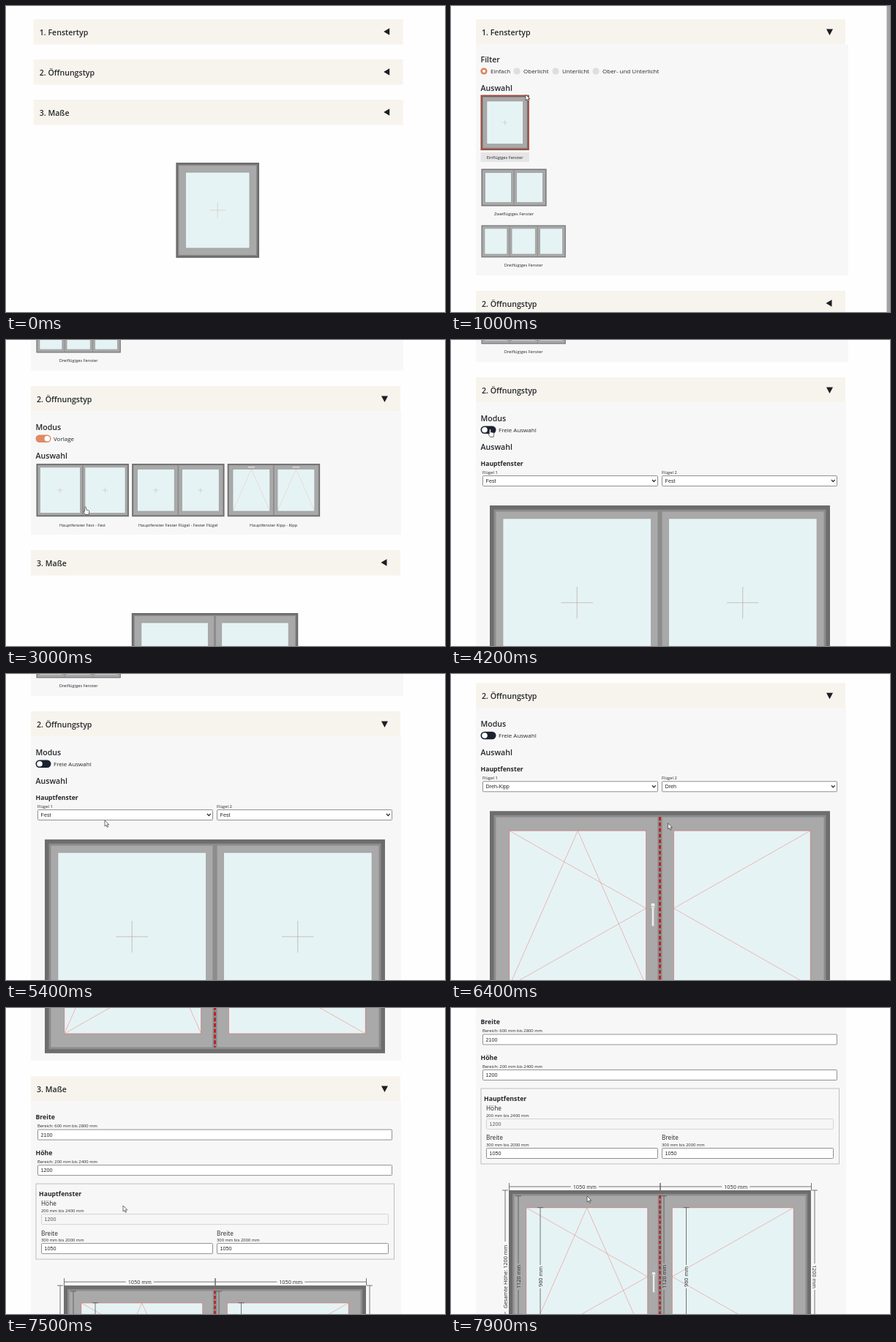
Recreate the animation shown at these times as an HTML page. Size 600 px wide and 418 px high, loop 8 s.

```html
<!DOCTYPE html>
<html lang="de">
<head>
<meta charset="utf-8">
<title>Fensterkonfigurator</title>
<style>
  html, body { margin: 0; width: 100%; height: 100%; overflow: hidden; background: #fefefe; }
  svg { display: block; width: 100vw; height: 100vh; }
  text { font-family: "Open Sans", "Noto Sans", sans-serif; fill: #25272b; }
  text.field { font-family: "Liberation Sans", sans-serif; }
</style>
</head>
<body>
<svg id="stage" viewBox="0 0 600 418"></svg>
<script>
const LOOP = 8000, STEP = 100;
const stage = document.getElementById('stage');

// Keyframes: [time, value...]
const SCROLL = [[1400, 0], [1900, 170], [2500, 170], [2900, 326], [3200, 326], [3800, 338],
  [6300, 338], [6700, 586], [7000, 586], [7900, 898]];
const POINTER = [[200, 190, 70], [400, 110, 38], [600, 110, 38], [1000, 102, 121], [1300, 100, 248],
  [1700, 100, 248], [2100, 99, 230], [2600, 99, 230], [3000, 107, 228], [3300, 107, 228],
  [3900, 52, 122], [4400, 52, 122], [5200, 130, 194], [5400, 135, 200], [6100, 135, 200],
  [6200, 135, 192], [6300, 350, 192], [6600, 144, 238], [6800, 144, 238], [6900, 120, 290],
  [7100, 120, 290], [7800, 186, 257]];

function track(keys, t) {
  if (t <= keys[0][0]) return keys[0].slice(1);
  for (let i = 1; i < keys.length; i++) {
    const a = keys[i - 1], b = keys[i];
    if (t < b[0]) {
      const p = (t - a[0]) / (b[0] - a[0]), e = p * p * (3 - 2 * p);
      return a.slice(1).map((v, k) => v + (b[k + 1] - v) * e);
    }
  }
  return keys[keys.length - 1].slice(1);
}

const rect = (x, y, w, h, fill, more = '') =>
  `<rect x="${x}" y="${y}" width="${w}" height="${h}" fill="${fill}" ${more}/>`;
const path = (d, stroke, width = 0.6, more = '') =>
  `<path d="${d}" fill="none" stroke="${stroke}" stroke-width="${width}" ${more}/>`;
const shape = (d, fill, more = '') => `<path d="${d}" fill="${fill}" ${more}/>`;
const group = (x, y, body) => `<g transform="translate(${x} ${y})">${body}</g>`;

// y is the vertical middle of the capitals
function text(s, x, y, size, more = '') {
  return `<text x="${x}" y="${y + size * 0.36}" font-size="${size}" ${more}>${s}</text>`;
}
const title = (s, x, y) => text(s, x, y, 10.6, 'font-weight="600"');
const bold = (s, x, y) => text(s, x, y, 8.7, 'font-weight="700"');
const hint = (s, x, y) => text(s, x, y, 5.8);
const caption = (s, x, y) => text(s, x, y, 5.7, 'text-anchor="middle"');

function field(x, y, w, value, disabled) {
  return rect(x + 0.5, y + 0.5, w - 1, 14, disabled ? '#f6f6f6' : '#fff',
      `stroke="${disabled ? '#ccc' : '#777'}" stroke-width=".8" rx="1"`) +
    text(value, x + 4.5, y + 7.5, 7.2, `class="field"${disabled ? ' fill-opacity=".75"' : ''}`);
}
const select = (x, y, value) => field(x, y, 240, value) +
  path(`M${x + 232} ${y + 6}l2.3 2.6l2.3 -2.6`, '#222', 1.2);

// Window elevation. s: pixels per mm; one letter code per sash:
// f fixed, o fixed sash, k tilt, tt tilt and turn, d turn
function pane(x, y, s, sashes) {
  const n = sashes.length, W = 1050 * n * s, H = 1200 * s;
  let out = rect(x, y, W, H, '#6d6d6d') +
    rect(x + 25 * s, y + 25 * s, W - 50 * s, H - 50 * s, '#8c8c8c');
  sashes.forEach((type, i) => {
    const first = i === 0, last = i === n - 1, fixed = type === 'f';
    const edge = (a, b, outer, inner) => [
      x + (1050 * i + (first ? outer : inner)) * s,
      x + (1050 * (i + 1) - (last ? outer : inner)) * s, a, b];
    const [sl, sr] = edge(0, 0, 38, 14);
    out += rect(sl, y + 38 * s, sr - sl, H - 76 * s, '#a9a9a9');
    const inset = fixed ? 81 : 121;
    const [l, r] = edge(0, 0, inset, fixed ? 54 : 85);
    const t = y + inset * s, b = y + H - inset * s, cx = (l + r) / 2, cy = (t + b) / 2;
    const moving = type === 'tt' || type === 'd' || type === 'k';
    out += rect(l, t, r - l, b - t, '#e6f3f4',
      `stroke="${moving && type !== 'k' ? '#cf7272' : '#9a9a9a'}" stroke-width=".7"`);
    if (!moving && s > 0.06) {
      const c = (s > 0.1 ? 98 : 60) * s;
      out += path(`M${cx - c} ${cy}h${2 * c}M${cx} ${cy - c}v${2 * c}`, s > 0.2 ? '#b49a98' : '#d8bdb4');
    }
    if (type === 'k' || type === 'tt')
      out += path(`M${l} ${b}L${cx} ${t}L${r} ${b}`, '#e98f8f', s > 0.1 ? 0.6 : 0.25);
    if (type === 'tt') out += path(`M${l} ${t}L${r} ${cy}L${l} ${b}`, '#e98f8f');
    if (type === 'd') out += path(`M${r} ${t}L${l} ${cy}L${r} ${b}`, '#e98f8f');
    if (type === 'k') out += rect(cx - 80 * s, y + 68 * s, 160 * s, 20 * s, '#e8e8e8');
  });
  if (sashes.includes('d')) {
    const mx = x + 1050 * s, hx = mx - 43 * s, my = y + 600 * s;
    out += path(`M${mx} ${y + 36 * s}V${y + H - 36 * s}`, '#c4151c', 12 * s,
      `stroke-dasharray="${22 * s} ${13 * s}"`);
    const grip = 'stroke="#888" stroke-width=".4"';
    out += rect(hx - 13 * s, my - 32 * s, 26 * s, 32 * s, '#efefef', grip) +
      rect(hx - 8 * s, my - 12 * s, 16 * s, 122 * s, '#efefef', grip);
  }
  return out;
}

function header(y, label, open) {
  const arrow = open ? `M513 ${y + 13.5}h9l-4.5 8.5z` : `M512.5 ${y + 17}l8 -4.7v9.4z`;
  return rect(34, y, 505, 34.5, '#f7f4ed') + title(label, 42, y + 18) + shape(arrow, '#1d1f24');
}
const panel = (y, h, w = 506) => rect(34, y, w, h, '#f7f7f7');

function typeSection(y, picked) {
  let out = panel(y + 35, 315, 509) + title('Filter', 40.5, y + 55);
  [[45, 'Einfach'], [90, 'Oberlicht'], [143, 'Unterlicht'], [198, 'Ober- und Unterlicht']]
    .forEach(([x, label], i) => {
      out += `<circle cx="${x}" cy="${y + 71}" r="4.6" fill="${i ? '#dedede' : '#d98560'}"/>`;
      if (!i) out += `<circle cx="${x}" cy="${y + 71}" r="2" fill="#fff"/>`;
      out += text(label, x + 9, y + 71, 8);
    });
  out += title('Auswahl', 40.5, y + 94);
  [['Ein', 104, 0.0613, 182, 189], ['Zwei', 204, 0.0424, 260, 266], ['Drei', 281, 0.0366, 330, 336]]
    .forEach(([name, top, s, box, mid], i) => {
      const w = 1050 * (i + 1) * s, h = 1200 * s;
      if (i === picked)
        out += rect(40.5, y + box, w + 2, 13, '#e5e5e5');
      out += pane(41.5, y + top + 0.5, s, Array(i + 1).fill('o'));
      if (i === picked)
        out += rect(41.5, y + top + 0.5, w, h, 'none', 'stroke="#a14f42" stroke-width="2"');
      out += caption(name + 'flügiges Fenster', 41.5 + w / 2, y + mid);
    });
  return out;
}

function openingSection(y, free, picked, sashes) {
  let out = panel(y + 35, free ? 416 : 168) + title('Modus', 40.5, y + 56) +
    rect(40.5, y + 66.5, 21, 10.5, free ? '#1b2230' : '#df8a63', 'rx="5.2"') +
    `<circle cx="${free ? 46 : 56.3}" cy="${y + 71.7}" r="3.8" fill="#fff"/>` +
    text(free ? 'Freie Auswahl' : 'Vorlage', 65, y + 72, 8) + title('Auswahl', 40.5, y + 95);
  if (free) {
    const names = { f: 'Fest', tt: 'Dreh-Kipp', d: 'Dreh' };
    out += bold('Hauptfenster', 40.5, y + 118);
    sashes.forEach((type, i) => {
      const x = 43 + 245 * i;
      out += hint('Flügel ' + (i + 1), x, y + 130) + select(x, y + 134, names[type]);
    });
    return out + pane(53, y + 175, 465 / 2100, sashes);
  }
  [['f', 'Fest - Fest'], ['o', 'Fester Flügel - Fester Flügel'], ['k', 'Kipp - Kipp']]
    .forEach(([type, name], i) => {
      const x = 41.5 + 130.6 * i;
      if (i === picked) out += rect(x - 1, y + 183, 128.5, 13, '#e5e5e5');
      out += pane(x, y + 106, 0.0602, [type, type]);
      if (i === picked) out += rect(x, y + 106, 126.4, 72.2, 'none', 'stroke="#a14f42" stroke-width="2"');
      out += caption('Hauptfenster ' + name, x + 63, y + 189.5);
    });
  return out;
}

// Vertical dimension line with rotated label
function heightMark(x, y, h, label, turn, half) {
  const m = y + h / 2, size = 7.3;
  return path(`M${x} ${y}V${m - half}M${x} ${m + half}V${y + h}M${x - 4} ${y}h8M${x - 4} ${y + h}h8`, '#555', 0.8) +
    `<text transform="translate(${x} ${m}) rotate(${turn})" y="${size * 0.36}" font-size="${size}" text-anchor="middle">${label}</text>`;
}

function sizeSection(y, sashes) {
  let out = panel(y + 35, 500) + bold('Breite', 40.5, y + 56) +
    hint('Bereich: 600 mm bis 2800 mm', 43, y + 68) + field(43, y + 72.5, 485, '2100') +
    bold('Höhe', 40.5, y + 105) +
    hint('Bereich: 200 mm bis 2400 mm', 43, y + 116.5) + field(43, y + 121, 485, '1200') +
    rect(41, y + 147, 489.5, 103, 'none', 'stroke="#b9b9b9" stroke-width=".9"') +
    bold('Hauptfenster', 45, y + 161) + text('Höhe', 48, y + 174, 8.3) +
    hint('200 mm bis 2400 mm', 48, y + 184) + field(48, y + 188, 475, '1200', true);
  [48, 288].forEach(x => {
    out += text('Breite', x, y + 214.5, 8.3) + hint('300 mm bis 2000 mm', x, y + 224) +
      field(x, y + 228, 235, '1050');
  });
  const x = 79, top = y + 286, s = 413 / 2100, H = 1200 * s, line = y + 281;
  out += pane(x, top, s, sashes);
  [0, 1].forEach(i => {
    const a = x + 0.5 + 1050 * s * i, b = a + 1050 * s, m = (a + b) / 2;
    out += path(`M${a} ${line}H${m - 19}M${m + 19} ${line}H${b}M${a} ${line - 5}v10M${b} ${line - 5}v10`, '#555', 0.8) +
      text('1050 mm', m, line, 7.3, 'text-anchor="middle"') +
      heightMark(92 + 199 * i, top + 40 * s, 1120 * s, '1120 mm', -90, 18) +
      heightMark(122 + 199.5 * i, top + 120 * s, 960 * s, '960 mm', -90, 16);
  });
  return out + heightMark(74, top, H, 'Gesamte Höhe: 1200 mm', -90, 48) +
    heightMark(497, top, H, '1200 mm', 90, 18);
}

function pointer(x, y, hand) {
  const d = hand
    ? 'M1 0q1 -.6 1.4 .5v3.3l3.2 .8q1.3 .4 1.2 1.6l-.7 4.3h-4.5l-2.8 -3.8q-.2 -1.2 1.6 -.3v-5.6z'
    : 'M0 0v8l1.9 -1.7l1.3 3l1.4 -.6l-1.3 -2.9h2.5z';
  return group(x, y, shape(d, '#fff', 'stroke="#333" stroke-width=".7" stroke-linejoin="round"'));
}

function draw(t) {
  const [scroll] = track(SCROLL, t), [px, py] = track(POINTER, t);
  const open1 = t >= 500, open2 = t >= 2500, open3 = t >= 7000;
  const free = t >= 4100, picked = t >= 1300 ? 1 : 0;
  const sashes = !picked ? ['o'] : t < 3200 ? ['o', 'o'] :
    [t < 6200 ? 'f' : 'tt', t < 6300 ? 'f' : 'd'];

  const y1 = 18, y2 = y1 + (open1 ? 371 : 55);
  const y3 = y2 + (!open2 ? 55 : free ? 472 : 224), end = y3 + (open3 ? 500 : 0);
  let page = '';
  if (open1) page += typeSection(y1, picked);
  if (open2) page += openingSection(y2, free, t >= 3200 ? 0 : -1, sashes);
  if (open3) page += sizeSection(y3, sashes);
  page += header(y1, '1. Fenstertyp', open1) + header(y2, '2. Öffnungstyp', open2) +
    header(y3, '3. Maße', open3);
  const s = 130 / 1200;
  page += pane(285.5 - 525 * s * sashes.length, end + 86, s, sashes);

  let out = rect(0, 0, 600, 418, '#fefefe') + group(open1 ? 0 : 3.7, -scroll, page);
  if (t >= 500 && t < 1500) out += rect(595.5, 0, 4.5, 418, '#a2a2a2');
  const hand = t < 800 || (t >= 1200 && t < 4400) || (t >= 6800 && t < 7400);
  if (t >= 200) out += pointer(px, py, hand);
  stage.innerHTML = out;
}

let start = null, shown = -1;
function tick(now) {
  if (start === null) start = now;
  const t = Math.floor(((now - start) % LOOP) / STEP) * STEP;
  if (t !== shown) draw(shown = t);
  requestAnimationFrame(tick);
}
draw(0);
requestAnimationFrame(tick);
</script>
</body>
</html>
```
